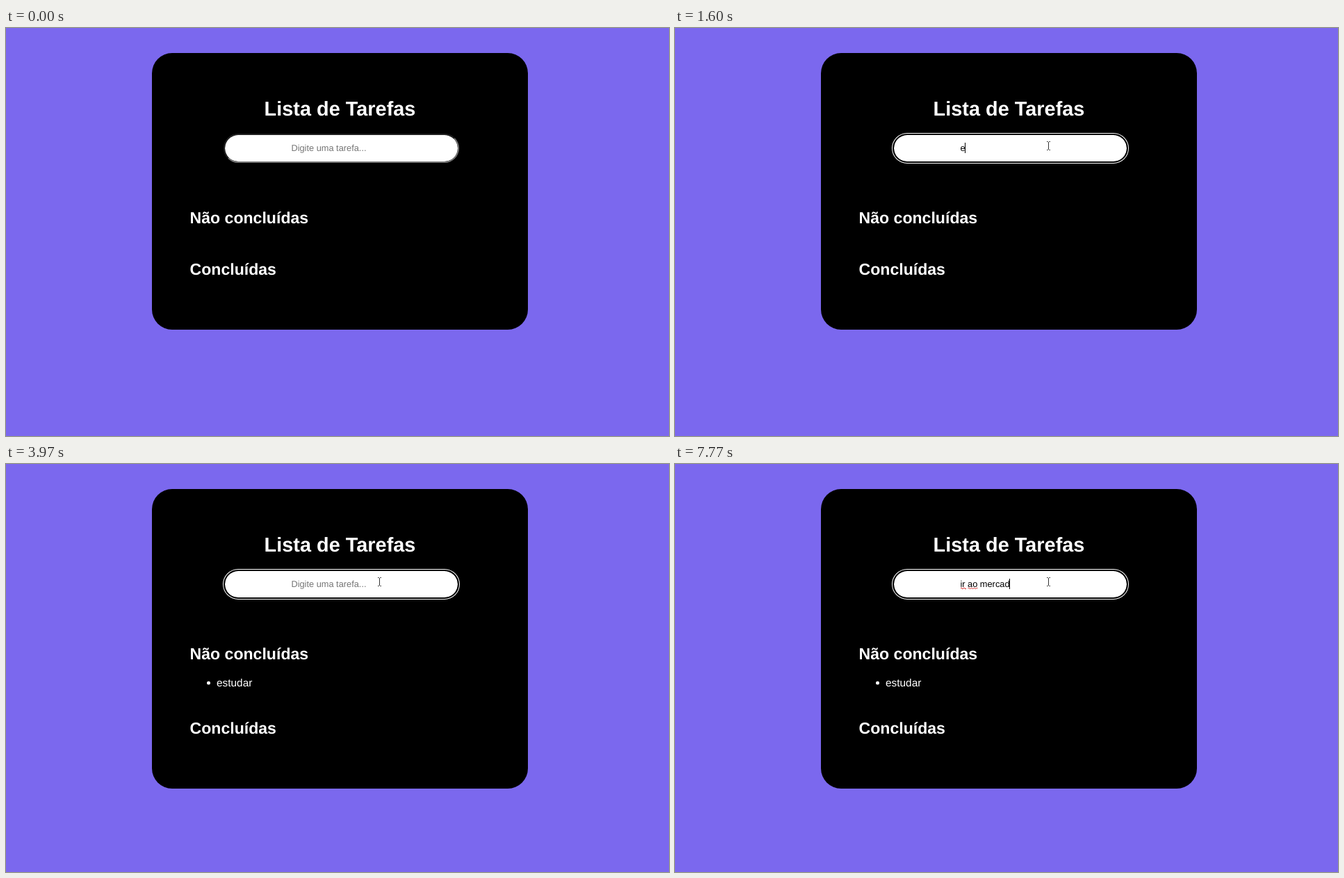
Animation, 954 px wide and 587 px high, one loop 8000 ms. Source, as an HTML page:

```html
<!DOCTYPE html>
<html lang="pt">
<head>
<meta charset="utf-8">
<title>Lista de Tarefas</title>
<style>
  html, body { margin: 0; width: 100%; height: 100%; overflow: hidden; background: #7b68ee; }
  div, svg { position: absolute; box-sizing: border-box; }
  svg { left: 0; top: 0; }
  #card { left: 210px; top: 36px; width: 540.5px; height: 398px; border-radius: 29px; background: #000; }
  #field { left: 313px; top: 152px; width: 339px; height: 42px; border-radius: 21px;
    border: 2px inset #767676; background: #fff padding-box; }
  #field.focus { border: 2px solid #000; box-shadow: 0 0 0 1px #fff; }
  text { font-family: "Liberation Sans", Arial, sans-serif; fill: #fff; white-space: pre;
    text-rendering: geometricPrecision; }
  .h { font-size: 23.1px; font-weight: bold; }
  .squiggle { fill: none; stroke: #d01818; stroke-width: .9; }
</style>
</head>
<body>
<div id="card"></div>
<div id="field"></div>
<svg width="954" height="587">
  <text x="480.5" y="126" text-anchor="middle" font-size="28.9" font-weight="bold">Lista de Tarefas</text>
  <text class="h" x="264.5" y="281.3">Não concluídas</text>
  <text class="h" id="done" x="264.5">Concluídas</text>
  <g id="item">
    <circle cx="291.5" cy="315" r="2.5" fill="#fff"/>
    <text x="303" y="319.5" font-size="15.4">estudar</text>
  </g>
  <text id="entry" x="410.4" y="177" font-size="12.8"></text>
  <path class="squiggle" id="wave1"/>
  <path class="squiggle" id="wave2"/>
  <rect id="caret" y="165" width="1" height="15"/>
  <circle id="click" cx="536" cy="168.5" r="11.5" fill="#ffff78"/>
  <path id="beam" d="M-2.5 -5.5H-.8M.8 -5.5H2.5M-2.5 6.5H-.8M.8 6.5H2.5M0 -5V6" fill="none" stroke="#333"/>
  <path id="arrow" d="M0 0V16L3.7 12.5L6.1 18L8.6 17L6.2 11.6H11.3Z" fill="#fff" stroke="#000" stroke-width=".9"/>
</svg>
<script>
const $ = id => document.getElementById(id);
const LOOP = 8000, CLICK = 870, ADD = 3970, TEXT_X = 410.4;
const ARRIVE = { from: 70, step: 66, count: 5, start: [893, 543], end: [537.5, 169] };

// Each word is typed one letter at a time, at these moments.
const words = [
  { text: 'estudar', keys: [1600, 1860, 1990, 2390, 2720, 2850, 2980], until: ADD },
  { text: 'ir ao mercad', keys: [4970, 5100, 5300, 5760, 5890, 6090, 6750, 6820, 7040, 7440, 7570, 7770], until: LOOP }
];
const caretOff = [[0, CLICK], [1400, 1600], [3510, 4030], [4510, 4970], [6620, 6750]];

const show = (id, on) => $(id).style.display = on ? '' : 'none';

function wave(x, end) {
  let d = `M${x} 179`;
  for (let up = -1; x < end; x += 2, up = -up) d += `q1 ${up * 2} 2 0`;
  return d;
}
$('wave1').setAttribute('d', wave(411, 418));
$('wave2').setAttribute('d', wave(421.5, 435.5));

function typed(t) {
  const word = words.find(w => t >= w.keys[0] && t < w.until);
  return word ? word.text.slice(0, word.keys.filter(k => t >= k).length) : '';
}

function drawPointer(t) {
  const { from, step, count, start, end } = ARRIVE;
  const i = Math.min(count, Math.floor((t - from) / step));
  const p = 1 - (1 - i / count) ** 2;
  const [x, y] = start.map((s, k) => s + (end[k] - s) * p);
  const inField = x > 313 && x < 652 && y > 152 && y < 194;
  for (const id of ['beam', 'arrow']) $(id).setAttribute('transform', `translate(${x} ${y})`);
  show('beam', t >= from && inField);
  show('arrow', t >= from && !inField);
}

function draw(t) {
  const text = typed(t), entry = $('entry'), added = t >= ADD;
  entry.textContent = text || 'Digite uma tarefa...';
  entry.style.fill = text ? '#000' : '#757575';
  const width = text ? entry.getSubStringLength(0, text.length) : 0.6;
  $('caret').setAttribute('x', Math.floor(TEXT_X + width));
  show('caret', !caretOff.some(([a, b]) => t >= a && t < b));
  show('wave1', t >= 5300);
  show('wave2', t >= 6090);
  $('field').className = t >= CLICK ? 'focus' : '';
  show('click', t >= CLICK && t < 940);
  show('item', added);
  $('done').setAttribute('y', added ? 388 : 355);
  $('card').style.height = (added ? 431 : 398) + 'px';
  drawPointer(t);
}

function tick() {
  draw(performance.now() % LOOP);
  requestAnimationFrame(tick);
}
tick();
</script>
</body>
</html>
```
